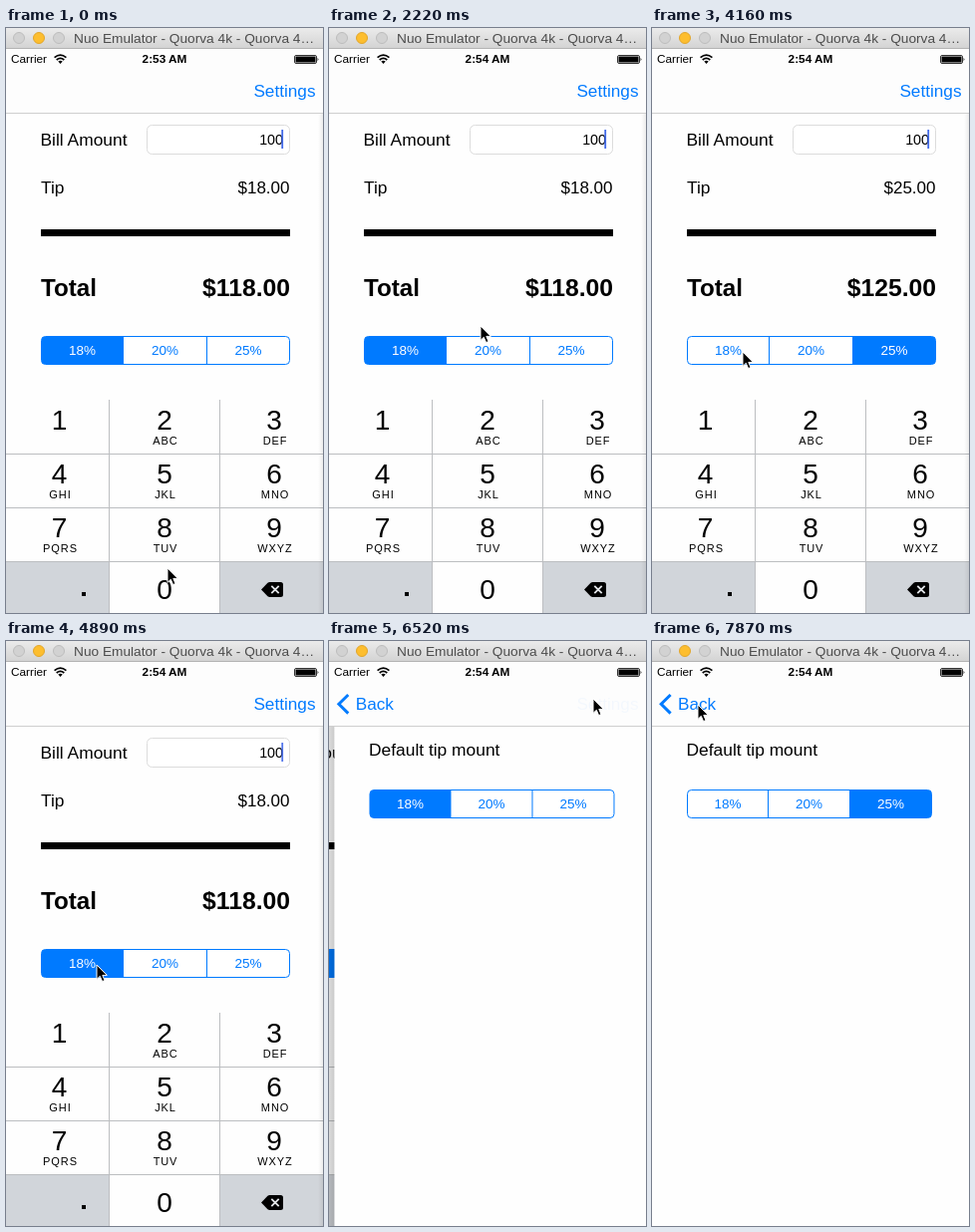
These frames come from a looping animation (318x587 px, 8000 ms). An HTML page:

```html
<!DOCTYPE html>
<html lang="en">
<head>
<meta charset="utf-8">
<title>Tip calculator</title>
<style>
  html, body { margin: 0; width: 100%; height: 100%; overflow: hidden; background: #fff; }
  svg { display: block; width: 100%; height: 100%; font-family: "Liberation Sans", Arial, sans-serif; }
</style>
</head>
<body>
<svg id="stage" viewBox="0 0 318 587">
  <defs>
    <linearGradient id="chrome" x1="0" y1="0" x2="0" y2="1">
      <stop offset="0" stop-color="#ebebeb"/><stop offset="1" stop-color="#d3d3d3"/>
    </linearGradient>
    <linearGradient id="shade">
      <stop offset="0" stop-color="#000" stop-opacity="0"/><stop offset="1" stop-color="#000" stop-opacity=".1"/>
    </linearGradient>
  </defs>
  <rect width="318" height="587" fill="#fff"/>
  <g id="main">
    <rect y="86" width="318" height="501" fill="#fefefe"/>
    <rect x="141.5" y="97.5" width="143" height="29" rx="5" fill="#fff" stroke="#dcdcdc"/>
    <rect id="caret" x="276.3" y="102" width="1.8" height="19" fill="#4169e8"/>
    <rect x="35" y="202" width="250" height="7"/>
  </g>
  <rect id="dim" y="86" width="318" height="501"/>
  <g id="prefs">
    <rect x="-7" y="86" width="7" height="501" fill="url(#shade)"/>
    <rect y="86" width="318" height="501" fill="#fefefe"/>
  </g>
  <g id="bar">
    <rect y="20" width="318" height="65" fill="#fdfdfd"/>
    <rect y="85" width="318" height="1" fill="#cfcfcf"/>
    <g fill="none" stroke="#000" stroke-width="1.7">
      <path d="M48.6 29.6Q54.5 24.6 60.4 29.6M50.7 32Q54.5 28.8 58.3 32"/>
    </g>
    <path d="M52.3 33.6Q54.5 31.8 56.7 33.6L54.5 36Z"/>
    <rect x="289.5" y="27.5" width="22" height="8" rx="1.5" fill="none" stroke="#000" stroke-width=".8"/>
    <rect x="290.5" y="28.5" width="20" height="6" rx=".6"/>
    <path d="M312.6 29.8Q314.4 31.5 312.6 33.2Z"/>
    <g id="back"><path d="M18.6 54L9.2 63.3L18.6 72.6" fill="none" stroke="#007aff" stroke-width="3"/></g>
  </g>
  <g id="title">
    <rect width="318" height="20.5" fill="url(#chrome)"/>
    <rect y="20" width="318" height="1" fill="#b4b4b4"/>
    <g stroke-width="1">
      <circle cx="13" cy="10" r="5.5" fill="#d2d2d2" stroke="#bdbdbd"/>
      <circle cx="33" cy="10" r="5.5" fill="#fdbe2f" stroke="#e2a62b"/>
      <circle cx="53" cy="10" r="5.5" fill="#d2d2d2" stroke="#bdbdbd"/>
    </g>
  </g>
  <path id="mouse" d="M0 0V14.4L3.3 11.3L5.6 16.6L8 15.6L5.8 10.4H10.3Z" fill="#000" stroke="#fff" stroke-width="1" stroke-linejoin="round"/>
</svg>
<script>
const LOOP = 8000, STEP = LOOP / 54, BLUE = '#007aff';
const $ = id => document.getElementById(id);

function add(parent, tag, attrs) {
  const el = document.createElementNS('http://www.w3.org/2000/svg', tag);
  for (const k in attrs) el.setAttribute(k, attrs[k]);
  parent.appendChild(el);
  return el;
}

function label(parent, str, x, y, size, extra) {
  const el = add(parent, 'text', { x, y, 'font-size': size, ...extra });
  el.textContent = str;
  return el;
}

const mid = { 'text-anchor': 'middle' }, end = { 'text-anchor': 'end' };
const main = $('main'), prefs = $('prefs'), bar = $('bar'), back = $('back');

// Segmented control; returns a function that selects one part.
function segments(parent, id, y, edges) {
  const x = edges[0], box = { x, y, width: edges[3] - x, height: 28, rx: 4 };
  add(add(parent, 'clipPath', { id }), 'rect', box);
  add(parent, 'rect', { ...box, fill: '#fff' });
  const fill = add(parent, 'rect', { y, height: 28, fill: BLUE, 'clip-path': `url(#${id})` });
  add(parent, 'rect', { ...box, fill: 'none', stroke: BLUE });
  for (const e of edges.slice(1, 3)) add(parent, 'path', { d: `M${e} ${y}v28`, stroke: BLUE });
  const texts = ['18%', '20%', '25%'].map((s, i) =>
    label(parent, s, (edges[i] + edges[i + 1]) / 2, y + 18.6, 13.5, mid));
  return pick => {
    fill.setAttribute('x', edges[pick]);
    fill.setAttribute('width', edges[pick + 1] - edges[pick]);
    texts.forEach((el, i) => el.setAttribute('fill', i === pick ? '#fff' : BLUE));
  };
}

function keypad() {
  const letters = ['', 'ABC', 'DEF', 'GHI', 'JKL', 'MNO', 'PQRS', 'TUV', 'WXYZ'];
  const cols = [53.5, 159, 269];
  add(main, 'rect', { y: 373, width: 318, height: 214, fill: '#fefefe' });
  for (const [x, w] of [[0, 103], [215, 103]])
    add(main, 'rect', { x, y: 536, width: w, height: 51, fill: '#d1d5da' });
  add(main, 'path', { d: 'M103.5 373V587M214.5 373V587M0 427.5H318M0 481.5H318M0 535.5H318', stroke: '#bcbec1' });
  letters.forEach((s, i) => {
    const x = cols[i % 3], y = 403 + 54 * Math.floor(i / 3);
    label(main, i + 1, x, y, 28, mid);
    label(main, s, x + 1, y + 15, 11, { ...mid, 'letter-spacing': .9 });
  });
  label(main, '0', 159, 573, 28, mid);
  add(main, 'rect', { x: 76, y: 566, width: 4, height: 4 });
  add(main, 'path', { d: 'M256 563.5L262.5 556.8Q263.4 556 264.5 556H275.5Q278 556 278 558.5V568.5Q278 571 275.5 571H264.5Q263.4 571 262.5 570.2Z' });
  add(main, 'path', { d: 'M266.3 559.8L273.7 567.2M273.7 559.8L266.3 567.2', stroke: '#e2e5e8', 'stroke-width': 1.8 });
}

label($('title'), 'Nuo Emulator - Quorva 4k - Quorva 4…', 68, 15, 13.7, { fill: '#4c4c4c' });
label(bar, 'Carrier', 5, 35, 11.8);
const clock = label(bar, '', 159, 35, 11.8, { ...mid, 'font-weight': 'bold' });
const settings = label(bar, 'Settings', 310.5, 69, 17.2, { ...end, fill: BLUE });
label(back, 'Back', 26, 69, 17.2, { fill: BLUE });

label(main, 'Bill Amount', 34.5, 118, 17.4);
label(main, '100', 278, 117, 14.3, end);
main.appendChild($('caret'));
label(main, 'Tip', 35, 166, 17.4);
const tip = label(main, '', 284.5, 166, 17, end);
label(main, 'Total', 35, 269, 24.2, { 'font-weight': 'bold' });
const total = label(main, '', 285, 269, 24.7, { ...end, 'font-weight': 'bold' });
const pickTip = segments(main, 'clipMain', 309.5, [35.5, 117.5, 201.5, 284.5]);
keypad();

label(prefs, 'Default tip mount', 34.5, 115, 17.4);
const pickDefault = segments(prefs, 'clipPrefs', 149.5, [35.5, 116.5, 198.5, 280.5]);

// Pointer stops: time, x, y
const stops = [
  [100, 162, 542], [740, 166, 321], [1150, 166, 321], [1930, 152, 299],
  [2250, 152, 299], [2820, 182, 320], [3111, 180, 317], [3180, 180, 317],
  [3560, 246, 321], [3720, 246, 321], [4148, 91, 325], [5080, 91, 325],
  [5790, 265, 58], [6640, 265, 58], [7080, 222, 153], [7425, 220, 153], [7850, 46, 64]
];
const clamp = v => Math.max(0, Math.min(1, v));

function pointer(t) {
  let i = stops.findIndex(s => s[0] > t);
  if (i < 0) i = stops.length - 1;
  const b = stops[i], a = stops[i - 1] || b;
  const u = a === b ? 0 : clamp((t - a[0]) / (b[0] - a[0]));
  const k = u * u * (3 - 2 * u);
  return [a[1] + (b[1] - a[1]) * k, a[2] + (b[2] - a[2]) * k];
}

function blink(t) {
  const phase = t % 1040;
  return phase < 540 ? clamp((330 - phase) / 130) : clamp((phase - 610) / 130);
}

// Critically damped push to the settings page
function push(t) {
  const s = Math.max(0, (t - 6203) * .01907);
  const p = 1 - (1 + s) * Math.exp(-s);
  return p > .997 ? 1 : p;
}

function draw(t) {
  const p = push(t);
  const pick = t < 2950 ? 0 : t < 3690 ? 1 : t < 4580 ? 2 : 0;
  const rate = [18, 20, 25][pick];
  pickTip(pick);
  tip.textContent = `$${rate}.00`;
  total.textContent = `$${100 + rate}.00`;
  pickDefault(t < 7240 ? 0 : 2);
  clock.textContent = t < 1470 ? '2:53 AM' : '2:54 AM';
  $('caret').setAttribute('opacity', blink(t));

  main.setAttribute('transform', `translate(${-96 * p} 0)`);
  main.setAttribute('visibility', p < 1 ? 'visible' : 'hidden');
  prefs.setAttribute('transform', `translate(${320 * (1 - p)} 0)`);
  $('dim').setAttribute('opacity', .12 * p * (p < 1));
  back.setAttribute('transform', `translate(${40 * (1 - p)} 0)`);
  back.setAttribute('opacity', p);
  settings.setAttribute('opacity', t < 5910 ? 1 : p < 1 ? .22 * (1 - p) + .03 : 0);
  $('mouse').setAttribute('transform', `translate(${pointer(t)})`);
}

function frame(now) {
  draw(Math.floor((now % LOOP) / STEP + .05) % 54 * STEP);
  requestAnimationFrame(frame);
}
draw(0);
requestAnimationFrame(frame);
</script>
</body>
</html>
```
